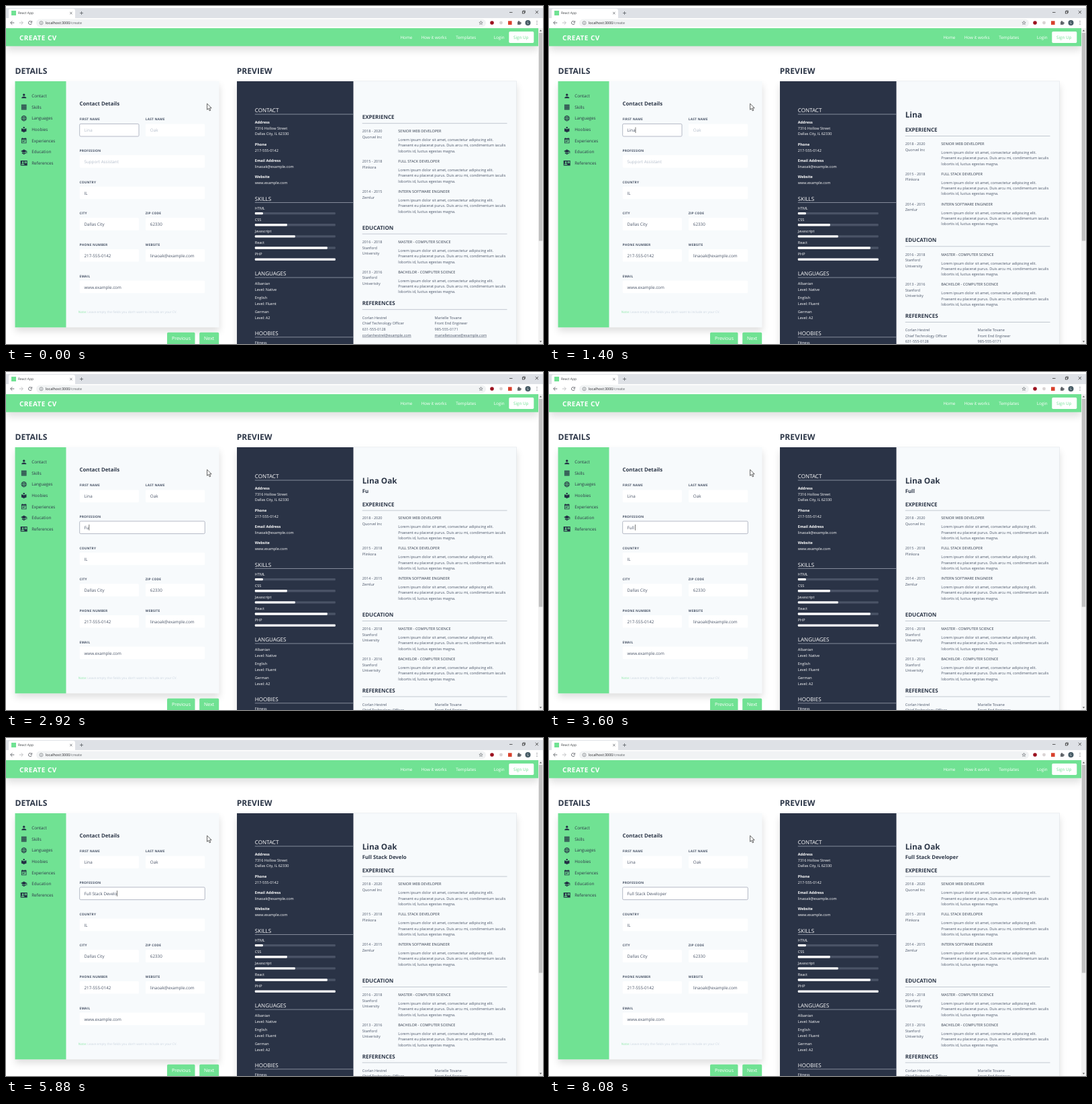
Recreate the animation shown at these times as an HTML page with a canvas. Size 800x503 px, loop 8.12 s.

```html
<!DOCTYPE html>
<html lang="en">
<head>
<meta charset="utf-8">
<title>Create CV</title>
<style>
html, body { margin: 0; width: 100%; height: 100%; overflow: hidden; background: #fff; }
canvas { display: block; width: 100vw; height: 100vh; }
</style>
</head>
<body>
<canvas id="stage"></canvas>
<script>
const W = 800, H = 503, LOOP = 8120;
const canvas = document.getElementById('stage');
const ctx = canvas.getContext('2d');
const dpr = window.devicePixelRatio || 1;
canvas.width = Math.round(W * dpr);
canvas.height = Math.round(H * dpr);

const GREEN = '#70e293', NAVY = '#2a3346', INK = '#2d3748', SLATE = '#4a5568',
      CARD = '#f7fafc', HINT = '#b4becb';
const XS = 4.75, SM = 5.5, MD = 6.28, LG = 7.85;

const FIRST = 'Lina', LAST = 'Oak', JOB = 'Full Stack Developer';
const MAIL = 'linaoak@example.com', PHONE = '217-555-0142', SITE = 'www.example.com';
const LOREM = [
  'Lorem ipsum dolor sit amet, consectetur adipiscing elit.',
  'Praesent eu placerat purus. Duis arcu mi, condimentum iaculis',
  'lobortis id, luctus egestas magna.'
];

// Key press times per field, and the moments the focus moves on
const keys = {
  first: [700, 860, 1020, 1160],
  last: [1720, 1860, 2000],
  job: [2640, 2860, 3060, 3240, 3440, 3780, 3960, 4120, 4300, 4480,
        4720, 4960, 5140, 5320, 5500, 5680, 5840, 6040, 6220, 6420]
};
const TAB1 = 1560, TAB2 = 2240, BLINK = 530;
const actions = [-BLINK, ...keys.first, TAB1, ...keys.last, TAB2, ...keys.job];

const typed = (word, times, t) => word.slice(0, times.filter(k => k <= t).length);

function stateAt(t) {
  const lastAction = actions.filter(a => a <= t).pop();
  return {
    first: typed(FIRST, keys.first, t),
    last: typed(LAST, keys.last, t),
    job: typed(JOB, keys.job, t),
    focus: t < TAB1 ? 'first' : t < TAB2 ? 'last' : 'job',
    caret: Math.floor((t - lastAction) / BLINK) % 2 === 0
  };
}

function text(s, x, y, size, color, weight = 400, spacing = 0) {
  ctx.font = `${weight} ${size}px "Open Sans", "Noto Sans", sans-serif`;
  ctx.letterSpacing = spacing + 'px';
  ctx.fillStyle = color;
  ctx.fillText(s, x, y);
  return ctx.measureText(s).width;
}

function rect(x, y, w, h, color) {
  ctx.fillStyle = color;
  ctx.fillRect(x, y, w, h);
}

function round(x, y, w, h, r, fill, stroke, lw = 0.8) {
  ctx.beginPath();
  ctx.roundRect(x, y, w, h, r);
  if (fill) { ctx.fillStyle = fill; ctx.fill(); }
  if (stroke) { ctx.strokeStyle = stroke; ctx.lineWidth = lw; ctx.stroke(); }
}

function disc(x, y, r, color) {
  ctx.beginPath();
  ctx.arc(x, y, r, 0, Math.PI * 2);
  ctx.fillStyle = color;
  ctx.fill();
}

function line(points, color, lw = 0.8) {
  ctx.beginPath();
  points.forEach(([x, y], i) => i ? ctx.lineTo(x, y) : ctx.moveTo(x, y));
  ctx.strokeStyle = color;
  ctx.lineWidth = lw;
  ctx.stroke();
}

function shadowed(alpha, draw, blur = 10, dy = 6) {
  ctx.save();
  ctx.shadowColor = `rgba(0,0,0,${alpha})`;
  ctx.shadowBlur = blur * dpr;
  ctx.shadowOffsetY = dy * dpr;
  draw();
  ctx.restore();
}

function browser() {
  const grey = '#5f6368';
  rect(0, 0, W, 33, '#fff');
  rect(0, 3, W, 15, '#dee1e6');
  round(4, 4, 99, 16, [3, 3, 0, 0], '#fff');
  rect(8, 7, 7, 7, GREEN);
  text('React App', 18, 12.4, 4.9, '#3c4043');
  line([[95.3, 9], [98.5, 12.2]], grey);
  line([[98.5, 9], [95.3, 12.2]], grey);
  line([[110, 10.5], [115, 10.5]], grey);
  line([[112.5, 8], [112.5, 13]], grey);
  line([[750, 9.5], [754.5, 9.5]], '#222', 0.7);
  ctx.strokeStyle = '#222';
  ctx.strokeRect(769.3, 8, 3, 3);
  line([[770.3, 8], [770.3, 7], [773.4, 7], [773.4, 10], [772.4, 10]], '#222', 0.6);
  line([[788.7, 7], [793, 11.3]], '#222', 0.7);
  line([[793, 7], [788.7, 11.3]], '#222', 0.7);

  line([[12.3, 25], [6.8, 25]], grey, 0.9);
  line([[9.3, 22.3], [6.6, 25], [9.3, 27.7]], grey, 0.9);
  line([[19.7, 25], [25.2, 25]], '#babcbe', 0.9);
  line([[22.7, 22.3], [25.4, 25], [22.7, 27.7]], '#babcbe', 0.9);
  ctx.beginPath();
  ctx.arc(36, 25, 2.5, 0.3, 5.5);
  ctx.strokeStyle = grey;
  ctx.lineWidth = 0.9;
  ctx.stroke();
  line([[38.6, 22], [38.6, 24.4], [36.3, 24.4]], grey, 0.8);

  round(45, 19.5, 670, 11.5, 5.7, '#f1f3f4');
  ctx.beginPath();
  ctx.arc(52.5, 25.2, 2.5, 0, 7);
  ctx.strokeStyle = grey;
  ctx.lineWidth = 0.6;
  ctx.stroke();
  rect(52.2, 24.8, 0.6, 1.8, grey);
  rect(52.2, 23.7, 0.6, 0.6, grey);
  const w = text('localhost:3000', 59, 27.2, 5.4, '#202124');
  text('/create', 59 + w, 27.2, 5.4, grey);

  const star = [];
  for (let i = 0; i <= 10; i++) {
    const a = -Math.PI / 2 + i * Math.PI / 5, r = i % 2 ? 1.2 : 2.8;
    star.push([707.5 + r * Math.cos(a), 25.2 + r * Math.sin(a)]);
  }
  line(star, grey, 0.6);
  disc(724, 25, 2.8, '#9c1320');
  disc(737.5, 25, 2.4, '#d9d3d3');
  rect(748, 22.3, 5.6, 5.6, '#d8402c');
  rect(762, 23.5, 4.5, 4.3, grey);
  disc(764, 23.2, 1.1, grey);
  disc(766.8, 25.4, 1.1, grey);
  disc(777.5, 25, 4, '#455a64');
  text('S', 776.1, 26.8, 4.8, '#fff');
  [22.7, 25, 27.3].forEach(y => disc(791, y, 0.6, grey));
}

function navbar() {
  shadowed(0.13, () => rect(0, 33, 793, 26.7, GREEN), 12, 6);
  text('CREATE CV', 20, 50.5, 10, '#fff', 700, 0.45);
  text('Home', 587.5, 49, MD, '#fff');
  text('How it works', 618.7, 49, MD, '#fff');
  text('Templates', 670.3, 49, MD, '#fff');
  text('Login', 726.7, 49, MD, '#fff');
  round(749.3, 38, 37, 17, 1.7, '#fff');
  text('Sign Up', 756, 49, MD, GREEN);
}

function scrollbar() {
  rect(793, 33, 7, 470, '#f1f1f1');
  rect(793.8, 40, 5.4, 309.5, '#c1c1c1');
  ctx.fillStyle = '#505050';
  ctx.fill(new Path2D('M794.8 37.6h3.4l-1.7-2z'));
  ctx.fill(new Path2D('M794.8 498.5h3.4l-1.7 2z'));
}

// Menu icons, drawn in a 24 unit box
const fillPath = d => ctx.fill(new Path2D(d), 'evenodd');
const icons = {
  Contact() {
    disc(12, 8, 4, '#233044');
    fillPath('M4 20v-2c0-2.7 5.3-4 8-4s8 1.3 8 4v2z');
  },
  Skills() {
    for (let i = 0; i < 5; i++) ctx.fillRect(3, 3 + i * 4, 18, 2.4);
    ctx.globalAlpha = 0.5;
    for (let i = 0; i < 4; i++) ctx.fillRect(3 + i * 5.2, 3, 2.4, 18);
  },
  Languages() {
    ctx.lineWidth = 2;
    for (const r of [9, 4]) {
      ctx.beginPath();
      ctx.ellipse(12, 12, r, 9, 0, 0, 7);
      ctx.stroke();
    }
    ctx.stroke(new Path2D('M4 9h16M4 15h16'));
  },
  Hoobies() {
    disc(12, 5, 3, '#233044');
    fillPath('M12 11.5C9.6 9.3 6.5 8 3 8v11c3.5 0 6.6 1.4 9 3.5 2.4-2.1 5.5-3.5 9-3.5V8c-3.5 0-6.6 1.3-9 3.5z');
  },
  Experiences() {
    fillPath('M3 3h18v18H3zM5 8v11h14V8z');
    fillPath('M6 1h2v2H6zM16 1h2v2h-2zM7 10h10v2H7zM7 14h7v2H7z');
  },
  Education() {
    fillPath('M5 13.2v4l7 3.8 7-3.8v-4L12 17z');
    fillPath('M12 3L1 9l11 6 9-4.9V17h2V9z');
  },
  References() {
    fillPath('M0 3h24v18H0zM14 6v6h8V6zM2 18h12c0-3-4-4.1-6-4.1S2 15 2 18zM8 6a3 3 0 1 0 0 6a3 3 0 1 0 0-6z');
    fillPath('M15 7l3 2 3-2v1l-3 2-3-2z');
  }
};

function sidebar() {
  rect(13.5, 112, 76, 366.3, GREEN);
  Object.keys(icons).forEach((name, i) => {
    const y = 133.8 + i * 16.67;
    ctx.save();
    ctx.translate(21.7, y - 5);
    ctx.scale(10 / 24, 10 / 24);
    ctx.fillStyle = ctx.strokeStyle = '#233044';
    icons[name]();
    ctx.restore();
    text(name, 38.2, y + 2.3, MD, INK);
  });
}

function field(label, x, row, w, value, hint, focused, caret) {
  const top = 175.4 + row * 46.65, base = top + 11.9;
  text(label, x, top - 5.1, 4.8, SLATE, 700, 0.2);
  round(x + 0.2, top, w, 18.6, 1.6, '#fff', focused && '#a3a8b8');
  const end = text(value || hint, x + 7, base, MD, value ? SLATE : HINT);
  if (focused && caret) rect(x + 7 + (value ? end : 0), top + 5, 0.6, 8.6, '#222');
}

function details(s) {
  text('DETAILS', 13.6, 100.6, 12.1, INK, 700);
  shadowed(0.13, () => rect(13.5, 112, 304, 366.3, CARD));
  sidebar();
  text('Contact Details', 109.5, 148.2, 7.8, INK, 700);
  const x1 = 109.5, x2 = 207.8, half = 88.3, full = 186.6;
  field('FIRST NAME', x1, 0, half, s.first, FIRST, s.focus === 'first', s.caret);
  field('LAST NAME', x2, 0, half, s.last, LAST, s.focus === 'last', s.caret);
  field('PROFESSION', x1, 1, full, s.job, 'Support Assistant', s.focus === 'job', s.caret);
  field('COUNTRY', x1, 2, full, 'IL');
  field('CITY', x1, 3, half, 'Dallas City');
  field('ZIP CODE', x2, 3, half, '62330');
  field('PHONE NUMBER', x1, 4, half, PHONE);
  field('WEBSITE', x2, 4, half, MAIL);
  field('EMAIL', x1, 5, full, SITE);
  text('Note:', 107.7, 457, XS, '#a5ebbb', 600);
  text("Leave empty the fields you don't want to include on your CV.", 121.3, 457, XS, '#cbd5e0');
  round(240, 485.8, 41.5, 18.5, 1.7, GREEN);
  text('Previous', 247, 497.2, 7.05, '#fff');
  round(288.2, 485.8, 29, 18.5, 1.7, GREEN);
  text('Next', 295, 497.2, 7.05, '#fff');
}

function darkHead(title, y) {
  text(title, 370.8, y, 8.05, '#fff');
  rect(370.8, y + 2.3, 146.7, 0.7, '#a9b0bd');
}

function darkColumn() {
  const white = '#fff', x = 370.8;
  rect(344, 112, 173.5, 391, NAVY);
  darkHead('CONTACT', 158.4);
  text('Address', x, 175, SM, white, 700);
  text('7316 Hollow Street', x, 184, SM, white);
  text('Dallas City, IL 62330', x, 192.4, SM, white);
  [['Phone', PHONE], ['Email Address', MAIL], ['Website', SITE]].forEach(([k, v], i) => {
    text(k, x, 207.8 + i * 24.15, SM, white, 700);
    text(v, x, 216.6 + i * 24.15, SM, white);
  });

  darkHead('SKILLS', 290);
  const skills = { HTML: 10, CSS: 40, Javascript: 50, React: 90, PHP: 100 };
  Object.entries(skills).forEach(([name, pct], i) => {
    const y = 303 + i * 17.12;
    text(name, x, y, SM, white);
    round(x, y + 3.9, 120, 3.4, 1, '#4a5366');
    round(x, y + 3.9, 1.2 * pct, 3.4, 1, white);
  });

  darkHead('LANGUAGES', 401.4);
  [['Albanian', 'Native'], ['English', 'Fluent'], ['German', 'A2']].forEach(([k, v], i) => {
    text(k, x, 414.8 + i * 20.95, SM, white);
    text('Level: ' + v, x, 423.6 + i * 20.95, SM, white);
  });
  darkHead('HOOBIES', 490.2);
  text('Fitness', x, 503.4, SM, white);
}

function lightHead(title, y) {
  text(title, 530.7, y, 8, INK, 700);
  rect(530.7, y + 6.1, 215.8, 0.6, '#a0a8b5');
}

function entry(y, years, place, title) {
  text(years, 530.7, y, SM, SLATE);
  place.forEach((p, i) => text(p, 530.7, y + 8.7 + i * 8.33, SM, SLATE));
  text(title, 584.3, y, SM, INK);
  LOREM.forEach((l, i) => text(l, 584.3, y + 12.9 + i * 8.4, SM, SLATE));
}

function person(x, y, name, role, phone, mail) {
  [name, role, phone].forEach((s, i) => text(s, x, y + i * 8.5, SM, SLATE));
  const w = text(mail, x, y + 26.2, SM, SLATE);
  rect(x, y + 27, w, 0.5, SLATE);
}

function lightColumn(s) {
  const name = [s.first, s.last].filter(Boolean).join(' ');
  if (name) text(name, 530.7, 166.2, 11.75, INK, 700);
  if (s.job) text(s.job, 530.7, 180.2, 7.8, INK, 700);
  ctx.save();
  ctx.translate(0, (name ? 18.75 : 0) + (s.job ? 12.5 : 0));
  lightHead('EXPERIENCE', 168.4);
  entry(188.1, '2018 - 2020', ['Quorvel Inc'], 'SENIOR WEB DEVELOPER');
  entry(233, '2015 - 2018', ['Plinkora'], 'FULL STACK DEVELOPER');
  entry(277.9, '2014 - 2015', ['Zemlur'], 'INTERN SOFTWARE ENGINEER');
  lightHead('EDUCATION', 332.7);
  entry(352.9, '2016 - 2018', ['Stanford', 'University'], 'MASTER - COMPUTER SCIENCE');
  entry(397.7, '2013 - 2016', ['Stanford', 'Univerisity'], 'BACHELOR - COMPUTER SCIENCE');
  lightHead('REFERENCES', 445.4);
  person(530.7, 465.7, 'Corlan Hestrel', 'Chief Technology Officer', '631-555-0128', 'corlanhestrel@example.com');
  person(638.6, 465.7, 'Marielle Tovane', 'Front End Engineer', '985-555-0171', 'marielletovane@example.com');
  ctx.restore();
}

function preview(s) {
  text('PREVIEW', 343.7, 100.6, 12.1, INK, 700);
  shadowed(0.13, () => rect(344, 112, 416.5, 420, CARD));
  line([[517.5, 111.8], [760.5, 111.8], [760.5, 503]], '#dfe4ea', 0.6);
  darkColumn();
  lightColumn(s);
}

function pointer() {
  const p = new Path2D('M299.6 145.3v9l2.1-1.9 1.5 3.5 1.6-.7-1.5-3.4h2.9z');
  ctx.fillStyle = '#fff';
  ctx.fill(p);
  ctx.strokeStyle = '#222';
  ctx.lineWidth = 0.7;
  ctx.stroke(p);
}

function draw(now) {
  const s = stateAt(now % LOOP);
  ctx.setTransform(canvas.width / W, 0, 0, canvas.height / H, 0, 0);
  ctx.textRendering = 'geometricPrecision';
  rect(0, 0, W, H, '#fff');
  details(s);
  preview(s);
  navbar();
  browser();
  scrollbar();
  pointer();
}

const start = performance.now();
function tick() {
  draw(performance.now() - start);
  requestAnimationFrame(tick);
}
tick();
</script>
</body>
</html>
```
